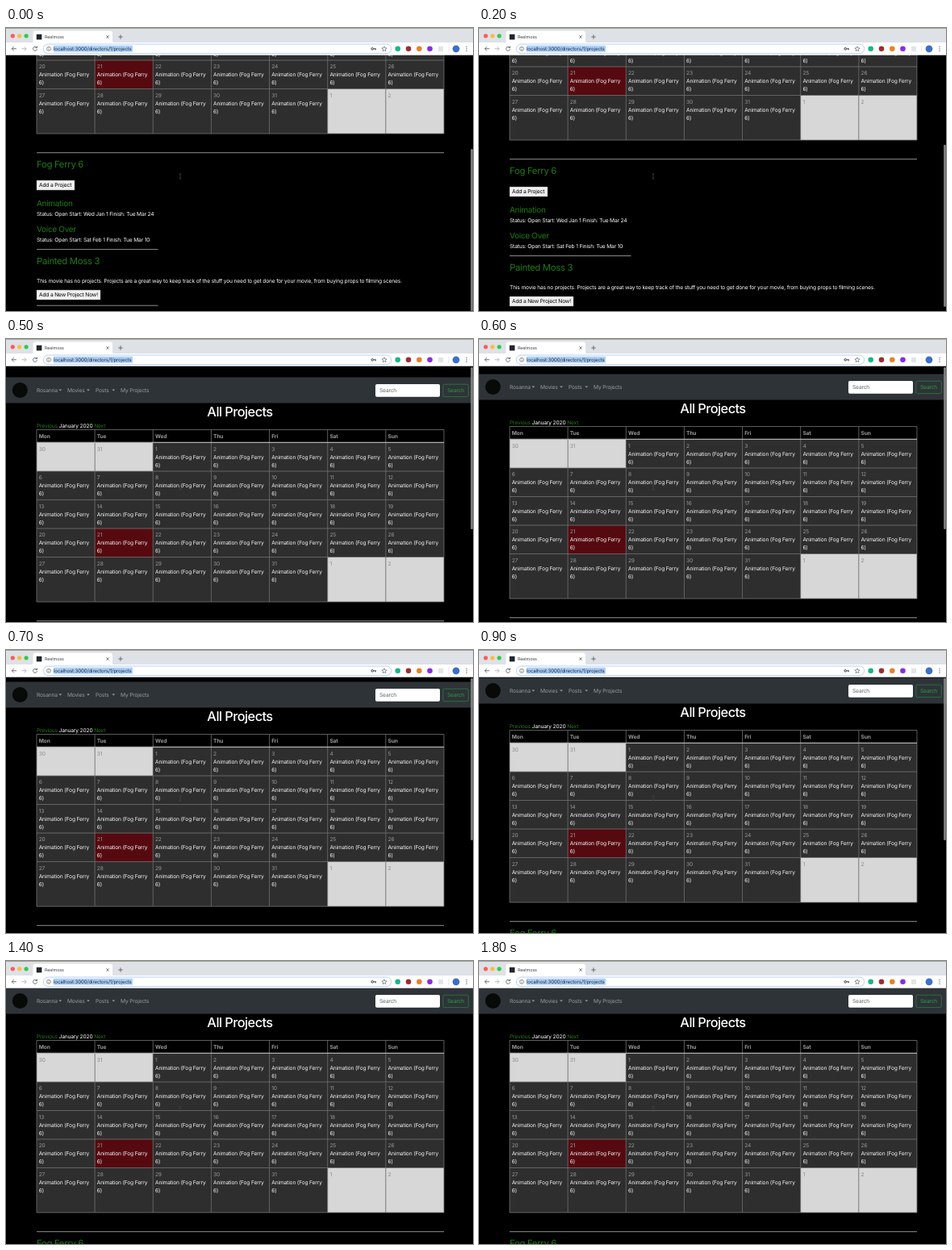
An HTML page for the animation above (1900 ms loop, 579 px wide and 351 px high).

```html
<!DOCTYPE html>
<html lang="en">
<head>
<meta charset="utf-8">
<title>Project calendar</title>
<style>
  html, body { margin: 0; width: 100%; height: 100%; overflow: hidden; background: #000; }
  svg { display: block; width: 579px; height: 351px; }
  text {
    font: 6.67px Inter, sans-serif;
    letter-spacing: -.025em;
    text-rendering: geometricPrecision;
    white-space: pre;
  }
  .title { font-size: 16.4px; font-weight: 500; letter-spacing: -.035em; text-anchor: middle; }
  .movie { font-size: 11.4px; letter-spacing: -.03em; }
  .task { font-size: 10px; letter-spacing: -.03em; }
  .head { font-weight: 700; }
  .url { font-size: 6.1px; letter-spacing: -.02em; }
  .tab { font-size: 5.4px; letter-spacing: -.02em; }
</style>
</head>
<body>
<svg id="stage" viewBox="0 0 579 351">
  <g id="page"></g>
  <g id="overlay"></g>
  <g id="browser"></g>
</svg>
<script>
const NS = 'http://www.w3.org/2000/svg';
const page = document.getElementById('page');
const overlay = document.getElementById('overlay');
const browser = document.getElementById('browser');
const GREEN = '#217a17', MUTED = '#989b9e', RULE = '#747474';

function add(parent, tag, attrs, content) {
  const node = document.createElementNS(NS, tag);
  for (const key in attrs) node.setAttribute(key, attrs[key]);
  if (content) node.textContent = content;
  parent.append(node);
  return node;
}
const box = (parent, x, y, width, height, fill, extra) =>
  add(parent, 'rect', { x, y, width, height, fill, ...extra });
const label = (parent, x, y, content, fill, cls = '') =>
  add(parent, 'text', { x, y, fill, class: cls }, content);
const dot = (parent, cx, cy, r, fill) => add(parent, 'circle', { cx, cy, r, fill });
const stroke = (parent, d, color, width = 1) =>
  add(parent, 'path', { d, stroke: color, 'stroke-width': width, fill: 'none' });

function drawNavbar() {
  box(page, 0, 33.5, 579, 32, '#2e3338');
  dot(page, 17.3, 49.5, 9.5, '#080a08');
  [[38, 'Rosanna', 67.3], [76, 'Movies', 102], [111, 'Posts', 133.3], [142, 'My Projects']]
    .forEach(([x, name, caret]) => {
      label(page, x, 52.2, name, MUTED);
      if (caret) add(page, 'path', { d: `M${caret - 2} 48.6h4l-2 2z`, fill: MUTED });
    });
  box(page, 458, 42, 80, 15.8, '#fff', { rx: 1.7 });
  label(page, 463, 52.2, 'Search', '#5c646b');
  box(page, 541.9, 42.2, 31.4, 15.4, 'none', { rx: 1.7, stroke: '#28953f', 'stroke-width': .6 });
  label(page, 547, 52.2, 'Search', '#28a03f');
}

function drawCalendar() {
  const left = 38, colWidth = 72.14, right = 543;
  const rows = [114.5, 150, 185.5, 221, 256.5, 312];
  const colX = c => left + c * colWidth;

  label(page, 290, 81.6, 'All Projects', '#fff', 'title');
  const month = label(page, left, 96.2, '', '#fff');
  [['Previous', GREEN], [' January 2020 ', '#fff'], ['Next', GREEN]]
    .forEach(([part, fill]) => add(month, 'tspan', { fill }, part));

  ['Mon', 'Tue', 'Wed', 'Thu', 'Fri', 'Sat', 'Sun']
    .forEach((day, c) => label(page, colX(c) + 2.7, 109, day, '#999', 'head'));

  for (let i = 0; i < 35; i++) {
    const x = colX(i % 7), r = Math.floor(i / 7), y = rows[r];
    const day = i - 1, inMonth = day >= 1 && day <= 31;
    const fill = !inMonth ? '#d7d7d7' : day === 21 ? '#560a10' : '#2e2e2e';
    box(page, x, y, colWidth, rows[r + 1] - y, fill);
    label(page, x + 2.7, y + 10.4, String(day < 1 ? day + 31 : inMonth ? day : day - 31),
      inMonth ? '#989898' : '#8a8a8a');
    if (inMonth) {
      label(page, x + 2.7, y + 20.4, 'Animation (Fog Ferry', '#f4f4f4');
      label(page, x + 2.7, y + 30.4, '6)', '#f4f4f4');
    }
  }
  for (let c = 0; c <= 7; c++) stroke(page, `M${colX(c)} 98.5V312`, RULE, .8);
  [98.5, ...rows].forEach(y => stroke(page, `M${left} ${y}H${right}`, RULE, .8));
  stroke(page, `M${left} 114.3H${right}`, '#c4c7ca', 1.1);
}

function drawProjects() {
  const rule = (y, x2) => stroke(page, `M38 ${y}H${x2}`, '#a0a0a0', .9);
  const button = (y, width, content) => {
    box(page, 38, y, width, 12, '#efefef', { stroke: '#8a8a8a', 'stroke-width': .4 });
    label(page, 41, y + 8.4, content, '#000');
  };
  rule(335.7, 543);
  label(page, 38, 354.3, 'Fog Ferry 6', GREEN, 'movie');
  button(370, 47, 'Add a Project');
  label(page, 38, 401.5, 'Animation', GREEN, 'task');
  label(page, 38, 414.2, 'Status: Open Start: Wed Jan 1 Finish: Tue Mar 24', '#fff');
  label(page, 38, 433.5, 'Voice Over', GREEN, 'task');
  label(page, 38, 446.2, 'Status: Open Start: Sat Feb 1 Finish: Tue Mar 10', '#fff');
  rule(455.6, 188.5);
  label(page, 38, 473.8, 'Painted Moss 3', GREEN, 'movie');
  label(page, 38, 497.2, 'This movie has no projects. Projects are a great way to keep track of the ' +
    'stuff you need to get done for your movie, from buying props to filming scenes.', '#fff');
  button(506, 79, 'Add a New Project Now!');
  rule(525.2, 188.5);
}

function drawBrowser() {
  const ICON = '#5f6368';
  box(browser, 0, 0, 579, 19, '#dee1e6');
  box(browser, 0, 0, 579, 1, '#a3a692');
  ['#fc5b57', '#fdbc40', '#34c84a'].forEach((fill, i) => dot(browser, 8.3 + i * 8.4, 9.8, 2.6, fill));
  add(browser, 'path', { d: 'M31 18.5q2.5 0 2.5-3V6.5q0-3 3-3H129q3 0 3 3v9q0 3 2.5 3z', fill: '#fff' });
  box(browser, 37.8, 7.8, 6.6, 6.6, '#20262c');
  label(browser, 48, 13, 'Reelmoss', '#3c4043', 'tab');
  stroke(browser, 'M124.3 9.3l3.4 3.4m0-3.4l-3.4 3.4', ICON, .8);
  stroke(browser, 'M139.3 11h5.4m-2.7-2.7v5.4', ICON, .9);

  box(browser, 0, 18, 579, 15.7, '#fff');
  stroke(browser, 'M12.8 25.7H7.3m2.5-2.6l-2.6 2.6 2.6 2.6', ICON, .9);
  stroke(browser, 'M19.5 25.7H25m-2.5-2.6l2.6 2.6-2.6 2.6', '#b4b7ba', .9);
  stroke(browser, 'M38 24.2a2.5 2.5 0 1 0 .5 2M38.5 22.6v2h-2', ICON, .9);
  box(browser, 46.3, 20, 431.4, 11.6, '#fff', { rx: 5.8, stroke: '#a9c6f3', 'stroke-width': .8 });
  add(browser, 'circle', { cx: 53, cy: 25.8, r: 2.5, fill: 'none', stroke: ICON, 'stroke-width': .7 });
  stroke(browser, 'M53 24.2v.6m0 .6v2', ICON, .7);
  box(browser, 59, 21.7, 98, 8, '#acd0fb');
  label(browser, 59, 27.9, 'localhost:3000/directors/1/projects', '#202a38', 'url');

  add(browser, 'circle', { cx: 454.2, cy: 25.8, r: 1.3, fill: 'none', stroke: '#3c4043', 'stroke-width': 1 });
  stroke(browser, 'M455.5 25.8h3.4m-.8 0v1.5', '#3c4043');
  add(browser, 'path', {
    d: 'M469 22.8l.9 2 2.2.2-1.7 1.5.5 2.1-1.9-1.1-1.9 1.1.5-2.1-1.7-1.5 2.2-.2z',
    fill: 'none', stroke: ICON, 'stroke-width': .7
  });
  [[485.7, '#15b887'], [499, '#9c2c30'], [512.3, '#e5822c'], [525.5, '#8a2be2']]
    .forEach(([x, fill]) => dot(browser, x, 25.8, 3.3, fill));
  box(browser, 536, 22.8, 6, 6, '#e2e4e6');
  stroke(browser, 'M549 21.5v8.5', '#dadce0', .7);
  dot(browser, 558, 25.8, 4.4, '#3d6fc4');
  [23.4, 25.8, 28.2].forEach(y => dot(browser, 571, y, .7, ICON));
}

drawNavbar();
drawCalendar();
drawProjects();
drawBrowser();
stroke(overlay, 'M214.6 180.7q1.4 0 1.4 1q0-1 1.4-1M216 181.5v5M214.6 187.3q1.4 0 1.4-1q0 1 1.4 1', '#444', .8);
const thumb = box(overlay, 576.2, 35, 2.6, 201, '#858585', { rx: 1.3 });

// Page offset per 100 ms: a flick to the top, then the rubber band settles.
const LOOP = 1900, STEP = 100, THUMB_HIDES = 1200;
const offsets = [-181, -179.5, -173, -152, -100, 14, 10, 6, 3, 1, .5, 0];

function render(now) {
  const time = now % LOOP;
  const offset = offsets[Math.min(Math.floor(time / STEP), offsets.length - 1)];
  page.setAttribute('transform', `translate(0 ${offset})`);
  thumb.setAttribute('y', 35 + Math.max(0, -offset) * .635);
  thumb.setAttribute('visibility', time < THUMB_HIDES ? 'visible' : 'hidden');
}

const start = performance.now();
function tick() {
  render(performance.now() - start);
  requestAnimationFrame(tick);
}
tick();
</script>
</body>
</html>
```
